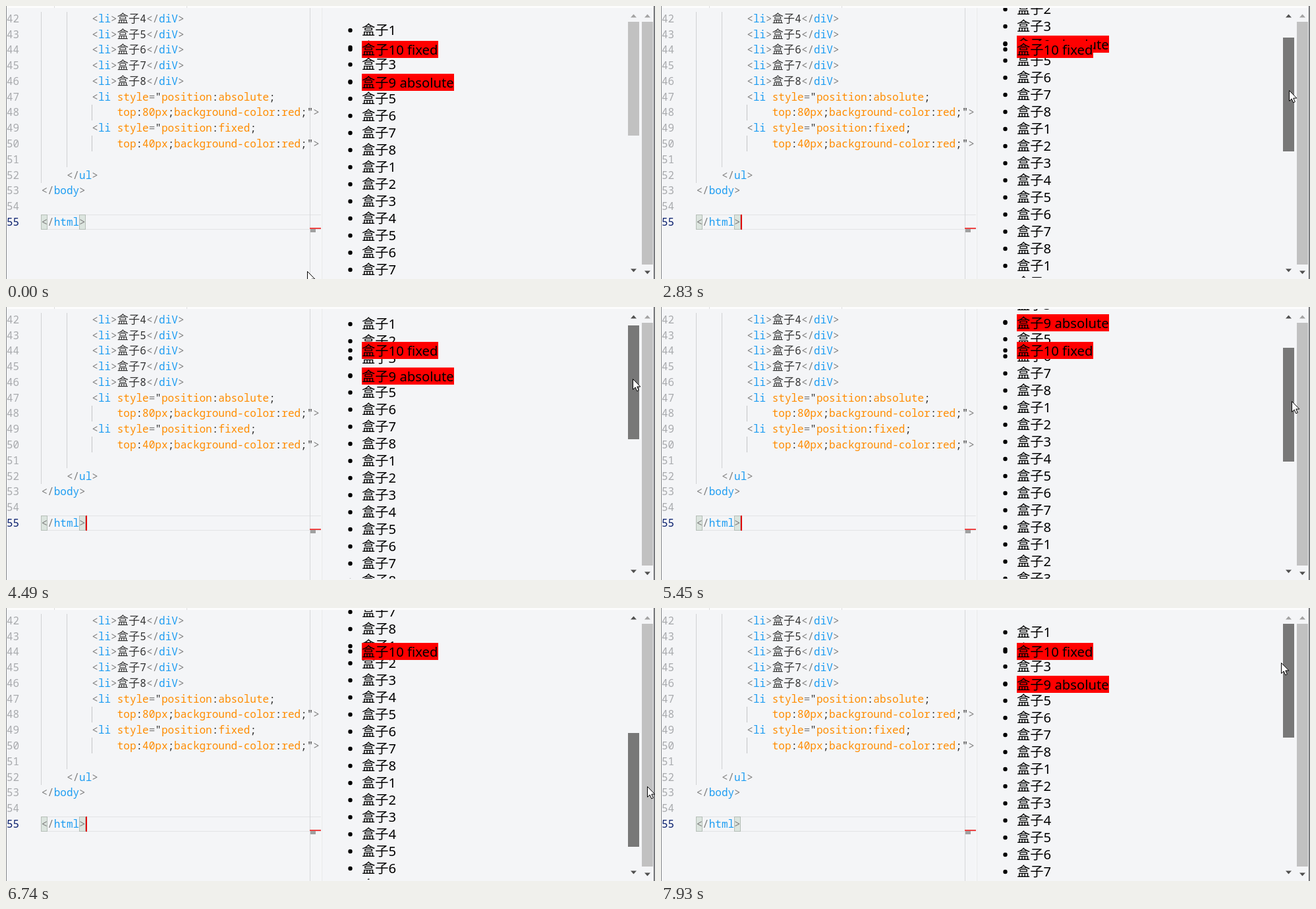
These frames come from a looping animation (985x415 px, 8000 ms). An HTML page with a canvas:

```html
<!DOCTYPE html>
<html lang="zh">
<head>
<meta charset="utf-8">
<title>Positioned list items</title>
<style>
  html, body { margin: 0; width: 100%; height: 100%; overflow: hidden; background: #f4f5f7; }
  canvas { display: block; }
</style>
</head>
<body>
<canvas id="stage" width="985" height="415"></canvas>
<script>
const ctx = document.getElementById('stage').getContext('2d');
const LOOP = 8000;
const CODE_FONT = '16px "Noto Sans Mono", monospace';
const CODE_CJK = '17px "Noto Sans CJK SC", "Noto Sans CJK", sans-serif';
const LIST_FONT = '20.3px "Noto Sans", "Noto Sans CJK SC", "Noto Sans CJK", sans-serif';
const CHAR = 9.6;
const LINE = 23.77;
const ROW = 26;
const GRAB_Y = 104;
const RATIO = 2.375;
const MAX_SCROLL = 464;
const HOVER_STEP = 10;
const DRAG_STEP = 15;
const GRAY = '#808080', BLUE = '#1e9df2', ORANGE = '#ff8c00', DARK = '#333333';

// Pointer path: step, x, y
const path = [
  [-1, 457, 403], [0, 787, 409], [3, 811, 345], [6, 811, 345], [7, 861, 228],
  [10, 949, 104], [11, 953, 105], [14, 951, 105], [18, 953, 136], [20, 953, 136],
  [22, 954, 143], [24, 954, 136.8], [29, 951, 108.6], [31, 951, 103],
  [36, 957, 142.7], [37, 957, 142.7], [42, 972, 236], [45, 973, 270.5],
  [46, 973, 270.5], [53, 943, 108], [55, 941, 83]
];

const code = [
  ...[4, 5, 6, 7, 8].map(n => `        <li>盒子${n}</diV>`),
  '        <li style="position:absolute;',
  '            top:80px;background-color:red;">',
  '        <li style="position:fixed;',
  '            top:40px;background-color:red;">',
  '', '    </ul>', '</body>', '', '</html>'
];

// The screen refreshes in steps, slightly faster near the end
function stepAt(t) {
  const step = t < 5972 ? (t - 480) / 137.5 : 40 + (t - 5972) / 128;
  return Math.max(-1, Math.floor(step));
}

function pointerAt(step) {
  const i = path.findLastIndex(p => p[0] <= step);
  const [s0, x0, y0] = path[i];
  const [s1, x1, y1] = path[Math.min(i + 1, path.length - 1)];
  const k = s1 > s0 ? (step - s0) / (s1 - s0) : 0;
  return [x0 + (x1 - x0) * k, y0 + (y1 - y0) * k];
}

function rect(x, y, w, h, color) {
  ctx.fillStyle = color;
  ctx.fillRect(x, y, w, h);
}

function text(str, x, y, color) {
  ctx.fillStyle = color;
  ctx.fillText(str, x, y);
}

function tokenColor(token, previous) {
  if (/[<>=]/.test(token)) return GRAY;
  if (/["':;\u4e00-\u9fff]/.test(token)) return DARK;
  return previous.startsWith('<') ? BLUE : ORANGE;
}

function drawCodeLine(line, y) {
  let x = 53.5, previous = '';
  for (const token of line.match(/<\/?|[\u4e00-\u9fff]+\d|[\w-]+|./g) || []) {
    const color = tokenColor(token, previous);
    for (const ch of token) {
      const wide = ch > '\u2fff';
      ctx.font = wide ? CODE_CJK : CODE_FONT;
      text(ch, x, y, color);
      x += wide ? 17.3 : CHAR;
    }
    previous = token;
  }
}

function bracketBox(x) {
  rect(x, 317, 10, 23, '#b5beb7');
  rect(x + 1, 318, 8, 21, '#dce5df');
}

function drawEditor(step) {
  ctx.save();
  ctx.beginPath();
  ctx.rect(0, 0, 478, 415);
  ctx.clip();
  rect(53, 317, 425, 1, '#e2e3e5');
  rect(53, 339, 425, 1, '#e2e3e5');
  rect(53, 9, 1, 260, '#d0d1d3');
  rect(92, 9, 1, 236, '#d0d1d3');
  rect(130, 150, 1, 24, '#c4c5c7');
  rect(130, 197, 1, 24, '#c4c5c7');
  rect(461, 3, 1, 412, '#d6d7d9');
  bracketBox(53);
  bracketBox(111);
  code.forEach((line, i) => {
    const y = Math.round(24.8 + i * LINE);
    ctx.font = CODE_FONT;
    text(String(42 + i), 1, y, i === code.length - 1 ? '#0b216f' : '#a9abae');
    drawCodeLine(line, y);
  });
  const caret = step >= DRAG_STEP && (step - DRAG_STEP) % 7 < 4;
  if (caret) rect(121, 317, 2, 23, '#e00000');
  rect(461, 337, 17, 2, '#ee4444');
  rect(462, 339, 8, 5, '#a0a0a0');
  ctx.restore();
}

function bullet(y) {
  ctx.fillStyle = '#000';
  ctx.beginPath();
  ctx.arc(522.5, y, 3.2, 0, Math.PI * 2);
  ctx.fill();
}

function redItem(label, top, width) {
  rect(540, top, width, ROW, '#ff0000');
  text(label, 540, top + 21, '#000');
  bullet(top + 13);
}

function drawList(scroll) {
  ctx.save();
  ctx.beginPath();
  ctx.rect(480, 3, 464, 410);
  ctx.clip();
  ctx.font = LIST_FONT;
  for (let i = 0; i < 32; i++) {
    const y = 37 + i * ROW - scroll;
    bullet(y);
    text('盒子' + (i % 8 + 1), 540, y + 7, '#000');
  }
  redItem('盒子9 absolute', 103 - scroll, 140);
  redItem('盒子10 fixed', 53, 116);
  ctx.restore();
}

function arrow(x, y, dir, color) {
  ctx.fillStyle = color;
  ctx.beginPath();
  ctx.moveTo(x - 4.5, y + 2.5 * dir);
  ctx.lineTo(x, y - 2.5 * dir);
  ctx.lineTo(x + 4.5, y + 2.5 * dir);
  ctx.fill();
}

function drawScrollbars(scroll, thumbColor) {
  const dark = '#505050', dim = '#a3a3a3';
  rect(944, 24 + Math.floor(scroll / RATIO), 17, 173, thumbColor);
  arrow(952.5, 15, 1, scroll > 0 ? dark : dim);
  arrow(952.5, 402, -1, dark);
  rect(965, 24, 17, 369, '#c1c1c1');
  arrow(973.5, 15, 1, dim);
  arrow(973.5, 405, -1, dark);
}

function drawPointer(x, y) {
  const shape = [[0, 0], [0, 16], [3.7, 12.6], [6.2, 18.3], [8.8, 17.2], [6.3, 11.6], [11.3, 11.6]];
  ctx.beginPath();
  shape.forEach(([dx, dy]) => ctx.lineTo(x + 0.5 + dx, y + 0.5 + dy));
  ctx.closePath();
  ctx.fillStyle = '#fff';
  ctx.fill();
  ctx.strokeStyle = '#000';
  ctx.lineWidth = 1;
  ctx.stroke();
}

function drawFrame() {
  rect(0, 0, 985, 415, '#f4f5f7');
  rect(0, 0, 985, 3, '#fcfcfc');
  rect(73, 0, 1, 3, '#dedede');
  rect(274, 0, 1, 3, '#dedede');
  rect(478, 3, 1, 412, '#fafafa');
  rect(479, 3, 1, 412, '#e6e7e9');
  rect(0, 0, 1, 415, '#85878a');
  rect(983, 0, 1, 415, '#606164');
  rect(984, 0, 1, 415, '#8a8c8f');
}

function draw(t) {
  const step = stepAt(t);
  const [x, y] = pointerAt(step);
  const dragging = step >= DRAG_STEP;
  const pulled = dragging ? Math.round((y - GRAB_Y) * RATIO) : 0;
  const scroll = Math.max(0, Math.min(MAX_SCROLL, pulled));
  const thumb = dragging ? '#787878' : step >= HOVER_STEP ? '#a8a8a8' : '#c1c1c1';

  drawFrame();
  drawEditor(step);
  drawList(scroll);
  drawScrollbars(scroll, thumb);
  drawPointer(Math.round(x), Math.round(y));
}

const start = performance.now();
function tick() {
  draw((performance.now() - start) % LOOP);
  requestAnimationFrame(tick);
}
tick();
</script>
</body>
</html>
```
